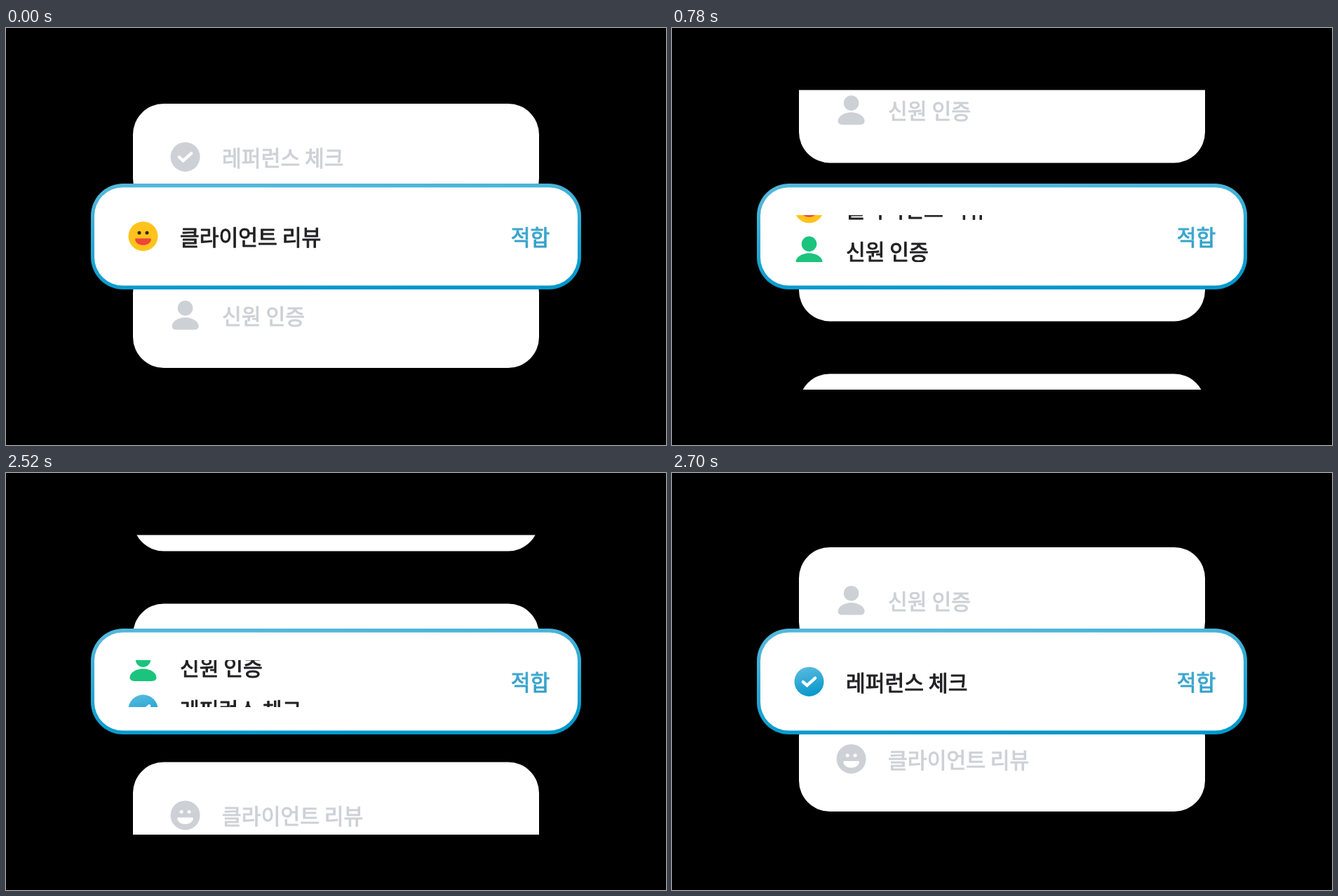
Write an HTML page with a canvas that moves like this. It is 941 px wide and 595 px high and loops after 6300 ms.

```html
<!DOCTYPE html>
<html lang="ko">
<head>
<meta charset="utf-8">
<title>Rolling checklist</title>
<style>
  html, body { margin: 0; width: 100%; height: 100%; overflow: hidden; background: #000; }
  canvas { display: block; width: 100vw; height: 100vh; }
</style>
</head>
<body>
<canvas id="stage" width="941" height="595"></canvas>
<script>
const W = 941, H = 595, LOOP = 6300, STEP = 30, STEPS = 10;
const GRAY = '#cdd1d6', INK = '#222224', GREEN = '#1bc47d';
const ctx = document.getElementById('stage').getContext('2d');

const LABELS = { ref: '레퍼런스 체크', review: '클라이언트 리뷰', id: '신원 인증' };
const SIDE = ['ref', 'id', 'ref', 'review', 'ref', 'review', 'id', 'review'];
const FRONT = ['review', 'id', 'ref'];

// cubic-bezier(.415, 0, 1, 1)
function easeIn(t) {
  if (t <= 0 || t >= 1) return Math.min(1, Math.max(0, t));
  let lo = 0, hi = 1;
  for (let i = 0; i < 30; i++) {
    const s = (lo + hi) / 2, r = 1 - s;
    const x = 1.245 * r * r * s + 3 * r * s * s + s ** 3;
    if (x < t) lo = s; else hi = s;
  }
  return lo * lo * (3 - 2 * lo);
}

const easeInOut = t => (1 - Math.cos(Math.PI * t)) / 2;

function progress(now, start) {
  const k = Math.floor((now - start) / STEP + 1e-6) + 1;
  return Math.min(1, Math.max(0, k / STEPS));
}

function fillGradient(x0, y0, x1, y1, from, to) {
  const g = ctx.createLinearGradient(x0, y0, x1, y1);
  g.addColorStop(0, from);
  g.addColorStop(1, to);
  return g;
}

function box(x, y, w, h, r, fill) {
  ctx.beginPath();
  ctx.roundRect(x, y, w, h, r);
  ctx.fillStyle = fill;
  ctx.fill();
}

function disc(x, y, r, fill) {
  ctx.beginPath();
  ctx.arc(x, y, r, 0, Math.PI * 2);
  ctx.fillStyle = fill;
  ctx.fill();
}

function text(str, x, y, fill) {
  ctx.font = '400 30.2px "Noto Sans CJK KR", "Noto Sans KR", "Noto Sans CJK", sans-serif';
  ctx.fillStyle = ctx.strokeStyle = fill;
  ctx.lineWidth = 1;
  ctx.lineJoin = 'round';
  ctx.fillText(str, x, y);
  ctx.strokeText(str, x, y);
}

const ICONS = {
  ref(active) {
    disc(0, 0, 21, active ? fillGradient(-5, -21, 5, 21, '#56bade', '#0597cb') : GRAY);
    ctx.beginPath();
    ctx.moveTo(-8.6, 0.4);
    ctx.lineTo(-3, 5.4);
    ctx.lineTo(8.6, -5);
    ctx.strokeStyle = '#fff';
    ctx.lineWidth = 4.4;
    ctx.lineCap = 'round';
    ctx.lineJoin = 'miter';
    ctx.stroke();
  },
  review(active) {
    disc(0, 0, 21, active ? '#ffc31c' : GRAY);
    for (const x of [-5.5, 5.5]) disc(x, -5, 2.5, active ? '#33271c' : '#fff');
    ctx.beginPath();
    ctx.moveTo(-10, 3);
    ctx.lineTo(10, 3);
    ctx.quadraticCurveTo(11.8, 3, 11.3, 5);
    ctx.bezierCurveTo(9.5, 15, -9.5, 15, -11.3, 5);
    ctx.quadraticCurveTo(-11.8, 3, -10, 3);
    ctx.fillStyle = active ? '#f04438' : '#fff';
    ctx.fill();
  },
  id(active) {
    const fill = active ? GREEN : GRAY;
    disc(0, -10.2, 10.8, fill);
    ctx.beginPath();
    ctx.moveTo(-19, 15.5);
    ctx.bezierCurveTo(-19, 8, -9, 3, 0, 3);
    ctx.bezierCurveTo(9, 3, 19, 8, 19, 15.5);
    ctx.bezierCurveTo(19, 19, 16, 20.7, 12, 20.7);
    ctx.lineTo(-12, 20.7);
    ctx.bezierCurveTo(-16, 20.7, -19, 19, -19, 15.5);
    ctx.fill();
  }
};

function row(kind, x, y, active) {
  ctx.save();
  ctx.translate(x, y);
  ICONS[kind](active);
  ctx.restore();
  text(LABELS[kind], x + 52.5, y + 13, active ? INK : GRAY);
}

function clipped(top, bottom, paint) {
  ctx.save();
  ctx.beginPath();
  ctx.rect(0, top, W, bottom - top);
  ctx.clip();
  paint();
  ctx.restore();
}

function draw(now) {
  const a = progress(now, 630), b = progress(now, 2430);
  const sideShift = 678 * easeIn(a) + 680 * easeIn(b);
  const frontShift = 61 * easeInOut(a) + 60.5 * easeInOut(b);

  ctx.fillStyle = '#000';
  ctx.fillRect(0, 0, W, H);

  clipped(88.5, 516, () => SIDE.forEach((kind, i) => {
    const y = 108 + 226 * i - sideShift;
    if (y > 516 || y < -80) return;
    box(181, y, 579, 151, 44, '#fff');
    row(kind, 255.6, y + 75.9, false);
  }));

  box(121, 222, 699, 151, 46, fillGradient(462, 222, 469, 373, '#52b7dc', '#0098cc'));
  box(126, 227.5, 689, 140, 40.5, '#fff');

  clipped(267, 334, () => FRONT.forEach((kind, i) => {
    row(kind, 195.5, 297.2 + 61 * i - frontShift, true);
  }));

  text('적합', 719.7, 310.3, fillGradient(0, 284, 0, 314, '#41a9d0', '#309fc8'));
}

const begin = performance.now();
function tick() {
  draw((performance.now() - begin) % LOOP);
  requestAnimationFrame(tick);
}
tick();
</script>
</body>
</html>
```
